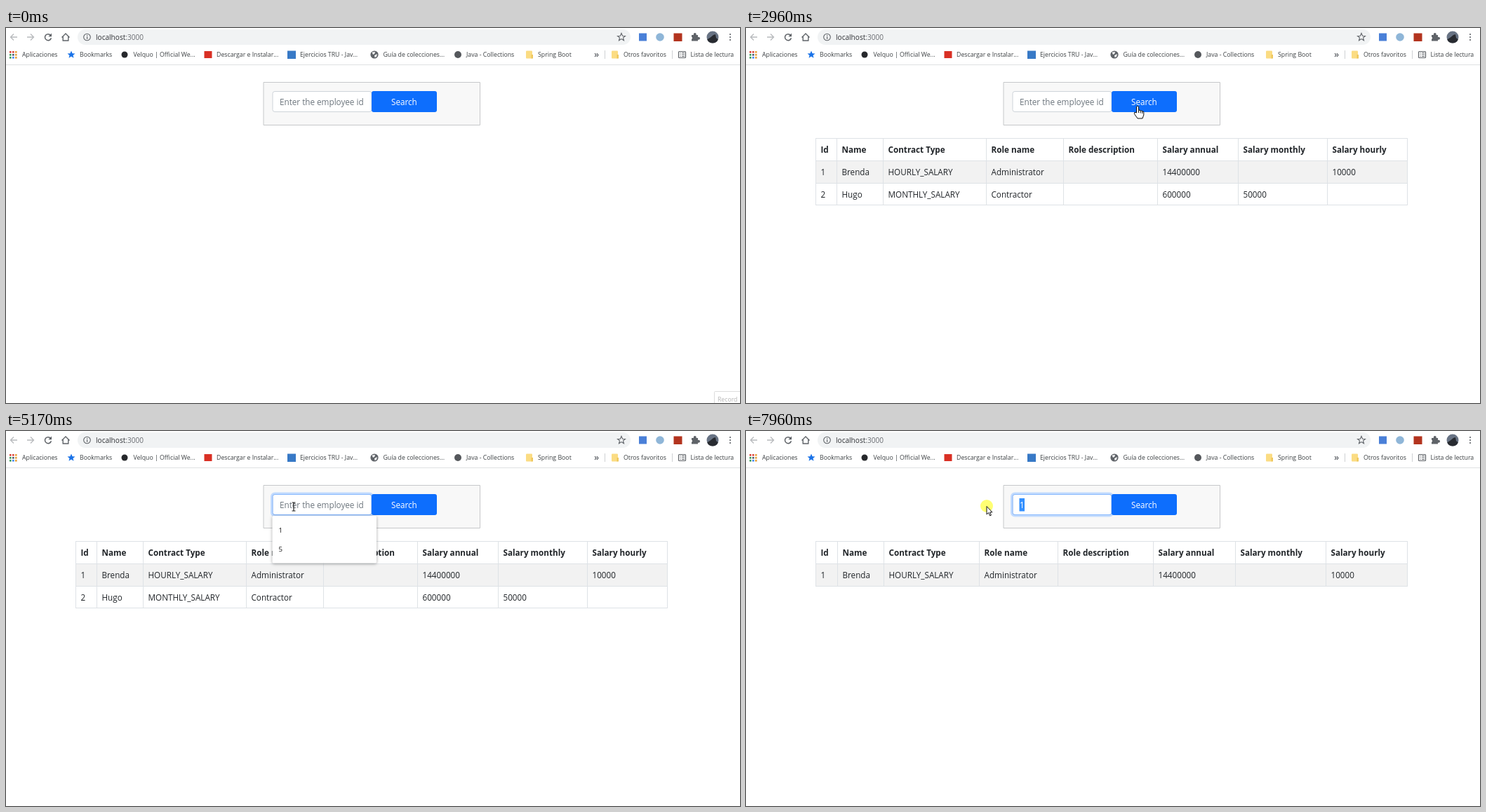
An HTML page with a canvas that plays this animation: 1046x535 px, repeating every 8000 ms.

```html
<!DOCTYPE html>
<html lang="es">
<meta charset="utf-8">
<title>Employee search</title>
<style>
html, body { margin: 0; width: 100%; height: 100%; overflow: hidden; background: #fff; }
canvas { display: block; }
</style>
<canvas id="stage" width="1046" height="535"></canvas>
<script>
const c = document.getElementById('stage').getContext('2d');
const LOOP = 8000, STEP = 70;
const GRAY = '#5f6368', INK = '#212529', BLUE = '#0d6efd';

// The picture advances in steps counted from these moments.
const anchors = [0, 330, 2130, 2960, 4630, 5170, 5630, 6530, 7140, 7690, 7890];
const path = [
  [330, 986, 516], [540, 640, 300], [750, 285, 165], [890, 330, 84], [1100, 402, 122],
  [1380, 440, 165], [1660, 520, 128], [1940, 558, 111], [2960, 558, 111],
  [3240, 112, 190], [3730, 860, 208], [3800, 850, 214], [4080, 108, 224],
  [4220, 441, 101], [4430, 410, 108], [5560, 410, 108], [5770, 402, 139],
  [5980, 402, 141], [6330, 560, 114], [7070, 560, 114], [7420, 403, 105],
  [7820, 403, 105], [7960, 343, 107]
];
const clicks = [[2010, 2270], [4630, 4770], [5910, 5980], [6530, 6670], [7690, 8000]];

const header = ['Id', 'Name', 'Contract Type', 'Role name', 'Role description',
  'Salary annual', 'Salary monthly', 'Salary hourly'];
const rows = [
  ['1', 'Brenda', 'HOURLY_SALARY', 'Administrator', '', '14400000', '', '10000'],
  ['2', 'Hugo', 'MONTHLY_SALARY', 'Contractor', '', '600000', '50000', '']
];
const wideCols = [99.5, 129.5, 195.5, 342.5, 452.5, 586.5, 701.5, 828.5, 942.5];
const narrowCols = [99.5, 130.5, 196.5, 332.5, 444.5, 580.5, 697.5, 826.5, 942.5];

function text(s, x, y, size = 11.7, color = INK, weight = 400) {
  c.font = `${weight} ${size}px "Open Sans", "Noto Sans", sans-serif`;
  c.fillStyle = color;
  c.fillText(s, x, y);
}
function rect(x, y, w, h, fill) {
  c.fillStyle = fill;
  c.fillRect(x, y, w, h);
}
function box(x, y, w, h, r, fill, stroke, width = 1) {
  c.beginPath();
  c.roundRect(x, y, w, h, r);
  paint(fill, stroke, width);
}
function disc(x, y, r, fill, stroke, width) {
  c.beginPath();
  c.arc(x, y, r, 0, 7);
  paint(fill, stroke, width);
}
function shape(d, x, y, fill, stroke, width) {
  c.save();
  c.translate(x, y);
  const p = new Path2D(d);
  if (fill) { c.fillStyle = fill; c.fill(p); }
  if (stroke) { c.strokeStyle = stroke; c.lineWidth = width || 1; c.stroke(p); }
  c.restore();
}
function paint(fill, stroke, width = 1) {
  if (fill) { c.fillStyle = fill; c.fill(); }
  if (stroke) { c.strokeStyle = stroke; c.lineWidth = width; c.stroke(); }
}
const within = (t, a, b) => t >= a && t < b;

function toolbar() {
  const star = 'M0-5.5L1.6-1.8 5.5-1.6 2.5.9 3.5 4.8 0 2.6-3.5 4.8-2.5.9-5.5-1.6-1.6-1.8Z';
  shape('M5 0H-4.5M0-4.5L-4.5 0 0 4.5', 11, 13, null, '#b8babd', 1.3);
  shape('M-5 0H4.5M0-4.5L4.5 0 0 4.5', 35, 13, null, '#b8babd', 1.3);
  shape('M3.6-2.6A4.5 4.5 0 1 0 4.4 1.2', 60, 13, null, GRAY, 1.5);
  shape('M5-5.4V-.8H.4Z', 60, 13, GRAY);
  shape('M-5.5 .5L0-5 5.5 .5M-3.8-.8V5H3.8V-.8', 85, 13, null, GRAY, 1.4);
  box(102, 2, 788, 22, 11, '#f1f3f4');
  disc(115.5, 13, 4.8, null, GRAY, 1.1);
  rect(115, 12.3, 1.2, 3.5, GRAY);
  rect(115, 10, 1.2, 1.3, GRAY);
  text('localhost', 128, 17, 10.1, '#303236');
  const host = c.measureText('localhost').width;
  text(':3000', 128 + host, 17, 10.1, '#6a6d72');
  shape(star, 877, 13, null, GRAY, 1.1);

  rect(902, 7.5, 11, 11, '#4a80d8');
  disc(932, 13, 5.8, '#8fb6d8');
  rect(951.5, 7.5, 12, 11.5, '#b3341f');
  shape('M-5-3H-2A2 2 0 1 1 1.5-3H4V0A2 2 0 1 1 4 3.4V5.5H-5V3A2 2 0 0 0-5-.5Z', 982, 13, GRAY);
  disc(1007, 13, 8.5, '#687384');
  shape('M-7.8 3.5Q-2 0 1-3L4-4 5 1 7.8 3.4A8.5 8.5 0 0 1-7.8 3.5Z', 1007, 13, '#282b31');
  for (const y of [9, 13, 17]) disc(1032, y, 1.1, GRAY);

  const dots = ['#dc4437', '#dc4437', '#e8a33c', '#3c9d58', '#4c5a70', '#e8a33c', '#3c9d58', '#4285f4', '#e8a33c'];
  dots.forEach((color, i) => rect(5 + i % 3 * 4, 33 + (i / 3 | 0) * 4, 2.6, 2.6, color));
  shape(star, 93, 38, '#1a73e8');
  disc(169, 38, 4.5, '#26282b');
  rect(282.5, 33, 11, 10, '#d93025');
  rect(401, 32.5, 12, 11.5, '#3779c6');
  disc(525, 38, 5.6, GRAY);
  shape('M-3.5-3.4L1-4 .5-1.5-2 0ZM0 1L4-1 3 3 .5 4Z', 525, 38, '#f4f4f4');
  disc(644, 38, 5, '#55585c');
  for (const x of [746, 868]) {
    box(x - 5, 32.5, 9, 11, 1, '#fbdc83');
    rect(x + 2.5, 38, 2.5, 5.5, '#efc75e');
  }
  for (const x of [853, 949]) rect(x, 32, 1, 12, '#cfd1d4');
  box(958.5, 33.5, 10, 9, 1, null, GRAY, 1.2);
  for (const y of [35.5, 38, 40.5]) {
    rect(960.5, y - .5, 1.2, 1, GRAY);
    rect(963, y - .5, 4, 1, GRAY);
  }
  const labels = [['Aplicaciones', 23], ['Bookmarks', 105], ['Velquo | Official We...', 181.5],
    ['Descargar e Instalar...', 300], ['Ejercicios TRU - Jav...', 419],
    ['Guía de colecciones...', 537.5], ['Java - Collections', 656], ['Spring Boot', 758],
    ['Otros favoritos', 880], ['Lista de lectura', 975.5]];
  for (const [s, x] of labels) text(s, x, 41, 8.75, '#3c4043');
  text('»', 838, 41.5, 13, GRAY, 600);
  rect(0, 52, 1046, 1, '#dfe1e3');
}

function table(cols, data) {
  const lines = [157.5, 189.5, 221.5, 252.5].slice(0, data.length + 2);
  const bottom = lines.at(-1);
  rect(99.5, 189.5, 843, 32, '#f2f2f2');
  c.beginPath();
  for (const y of lines) { c.moveTo(99, y); c.lineTo(943, y); }
  for (const x of cols) { c.moveTo(x, 157.5); c.lineTo(x, bottom); }
  paint(null, '#dee2e6');
  [header, ...data].forEach((row, r) => row.forEach((s, i) =>
    text(s, cols[i] + 7, 178.3 + r * 31.7, 11.7, INK, r ? 400 : 700)));
}

function pointerAt(t) {
  let i = path.findIndex(k => k[0] > t);
  if (i < 0) return path.at(-1).slice(1);
  const [t0, x0, y0] = path[i - 1], [t1, x1, y1] = path[i];
  const k = (t - t0) / (t1 - t0);
  return [x0 + (x1 - x0) * k, y0 + (y1 - y0) * k];
}

function form(t, hover) {
  const picked = t >= 5980, open = within(t, 4630, 5980);
  const ring = within(t, 4630, 4700) ? .5 : within(t, 4700, 6530) || t >= 7890 ? 1
    : within(t, 6530, 6600) ? .7 : 0;
  box(367, 77.5, 308.5, 61, 0, '#f8f8f8', '#c6c8ca');
  box(380, 90.5, 141, 29, 3, '#fff', '#ced4da');
  if (ring) {
    c.globalAlpha = ring;
    box(378.5, 89, 144, 32, 4.5, null, '#c2dbfe', 3);
    box(380, 90.5, 141, 29, 3, null, '#86b7fe');
    c.globalAlpha = 1;
  }
  box(521, 90, 93, 30, 3, hover ? '#0b5ed7' : BLUE);
  text('Search', 549, 109.5, 11.7, '#fff');

  if (t >= 7890) rect(389.5, 96, 7.5, 18.5, '#3390ff');
  if (picked) text('1', 390, 109.5, 11.7, t >= 7890 ? '#fff' : INK);
  else text('Enter the employee id', 390, 109.5, 11.7, '#6c757d');
  if (within(t, 4630, 5170)) rect(390, 97, 1, 17, INK);

  if (open) {
    c.save();
    c.shadowColor = 'rgba(0,0,0,.35)';
    c.shadowBlur = 4;
    c.shadowOffsetY = 1;
    box(379.5, 121, 148.5, 67.5, 2, '#fff');
    c.restore();
    if (within(t, 5770, 5980)) rect(379.5, 127, 148.5, 28, '#e8e8e9');
    text('1', 388.5, 144.5, 9.6, '#111');
    text('5', 388.5, 172, 9.6, '#111');
  }
  return open;
}

function cursor(x, y, overButton, overInput) {
  if (overButton) {
    shape('M-1.5 10V1.2Q0-.8 1.5 1.2V6.5Q3.5 5.5 4.2 7.2 6.2 6.2 6.8 8 8.8 7.3 8.8 9.3V13L7 18H0L-4.6 11.5Q-5 8.5-3 9.5Z'
      + 'M1.5 6.5V10M4.2 7.2V10.5M6.8 8V11', x, y, '#fff', '#111', 1);
  } else if (overInput) {
    shape('M-2.5-6H-.6L0-5.4 .6-6H2.5M0-5.4V5.4M-2.5 6H-.6L0 5.4 .6 6H2.5', x, y, null, '#222', 1.2);
  } else {
    shape('M0 0V11.5L2.7 9 4.6 13.4 6.4 12.6 4.6 8.4H8Z', x, y + .5, '#fff', '#111', 1);
  }
}

function draw(now) {
  const time = now % LOOP;
  const start = anchors.findLast(a => a <= time);
  const t = start + Math.floor((time - start) / STEP) * STEP;
  const [x, y] = t >= 330 ? pointerAt(t) : [-50, -50];
  const inRow = y >= 90 && y <= 120;
  const overButton = inRow && x >= 521 && x <= 614;
  const overInput = inRow && x >= 380 && x < 521;

  rect(0, 0, 1046, 535, '#fff');
  toolbar();
  if (t >= 6740) table(narrowCols, rows.slice(0, 1));
  else if (t >= 2340) table(wideCols, rows);
  form(t, overButton && !within(t, 2960, 5000));
  if (t < 70) {
    box(1009.5, 518.5, 45, 25, 1, '#fff', '#dcdcdc');
    text('Record', 1014, 532.5, 8.7, '#b4b4b4');
  }
  if (clicks.some(([a, b]) => within(t, a, b))) disc(x, y, 9, 'rgba(255,255,0,.55)');
  if (t >= 330) cursor(x, y, overButton, overInput);
}

function tick() {
  draw(performance.now());
  requestAnimationFrame(tick);
}
tick();
</script>
</html>
```
